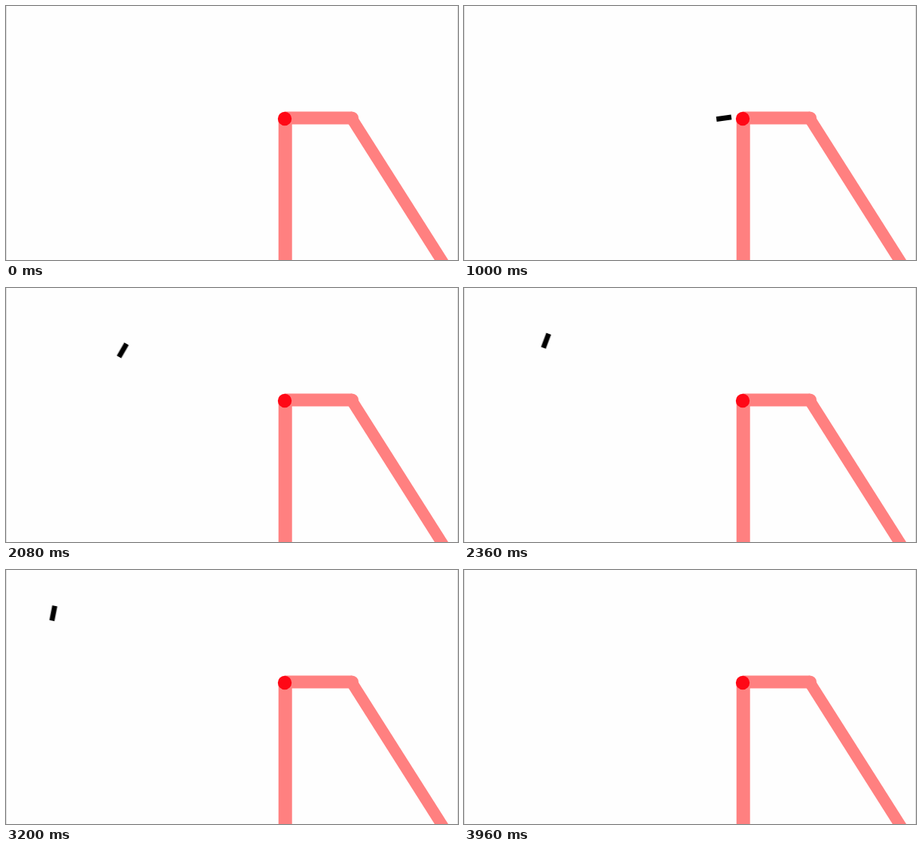
An HTML page that plays this animation: 600 px wide and 338 px high, repeating every 4080 ms.

```html
<!DOCTYPE html>
<html lang="en">
<head>
<meta charset="utf-8">
<title>Launched bar</title>
<style>
  html, body { margin: 0; width: 100%; height: 100%; overflow: hidden; background: #fefefe; }
  svg { display: block; width: 100vw; height: 100vh; }
  .soft { filter: blur(0.4px); }
</style>
</head>
<body>
<svg viewBox="0 0 600 338">
  <rect width="600" height="338" fill="#fefefe"/>
  <path d="M0.5 0V338M599.5 0V338" stroke="#dedede"/>
  <g class="soft">
    <rect id="bar" x="-10" y="-3.4" width="20" height="6.8" visibility="hidden"/>
    <g fill="none" stroke="#ff8080">
      <path d="M370.7 149V345" stroke-width="18"/>
      <path d="M370 149H459" stroke-width="17"/>
      <path d="M458.5 149L582.4 345" stroke-width="15.4"/>
    </g>
    <circle cx="459.3" cy="149.2" r="8.7" fill="#ff8080"/>
    <circle cx="370" cy="150" r="9.2" fill="#ff0816"/>
  </g>
</svg>
<script>
const LOOP = 4080, TICK = 40;
const bar = document.getElementById('bar');

// Time and step: out with short pauses, then back at double speed
const out = [[880, 0], [1120, 2], [1520, 8], [1640, 9], [2080, 16], [2720, 27], [2840, 28], [2920, 28]];
const back = [[3120, 28], [3520, 8], [3760, 0]];

// Step, x, y, angle
const path = [
  [1, 345, 149.3, -8],
  [8, 257.3, 115, -26],
  [16, 155, 83, -60],
  [27, 28.3, 48, -86]
];

// Linear between rows, extended past both ends
function sample(rows, at) {
  let i = 1;
  while (i < rows.length - 1 && rows[i][0] <= at) i++;
  const a = rows[i - 1], b = rows[i];
  const k = (at - a[0]) / (b[0] - a[0]);
  return a.slice(1).map((v, j) => v + (b[j + 1] - v) * k);
}

function draw(time) {
  const t = Math.floor(time / TICK) * TICK;
  const leg = [out, back].find(rows => t >= rows[0][0] && t < rows.at(-1)[0]);
  bar.setAttribute('visibility', leg ? 'visible' : 'hidden');
  if (!leg) return;
  const step = Math.floor(sample(leg, t)[0] + 1e-6);
  const [x, y, angle] = sample(path, step);
  bar.setAttribute('transform', `translate(${x} ${y}) rotate(${angle})`);
}

const start = performance.now();
function frame() {
  draw((performance.now() - start) % LOOP);
  requestAnimationFrame(frame);
}
frame();
</script>
</body>
</html>
```
